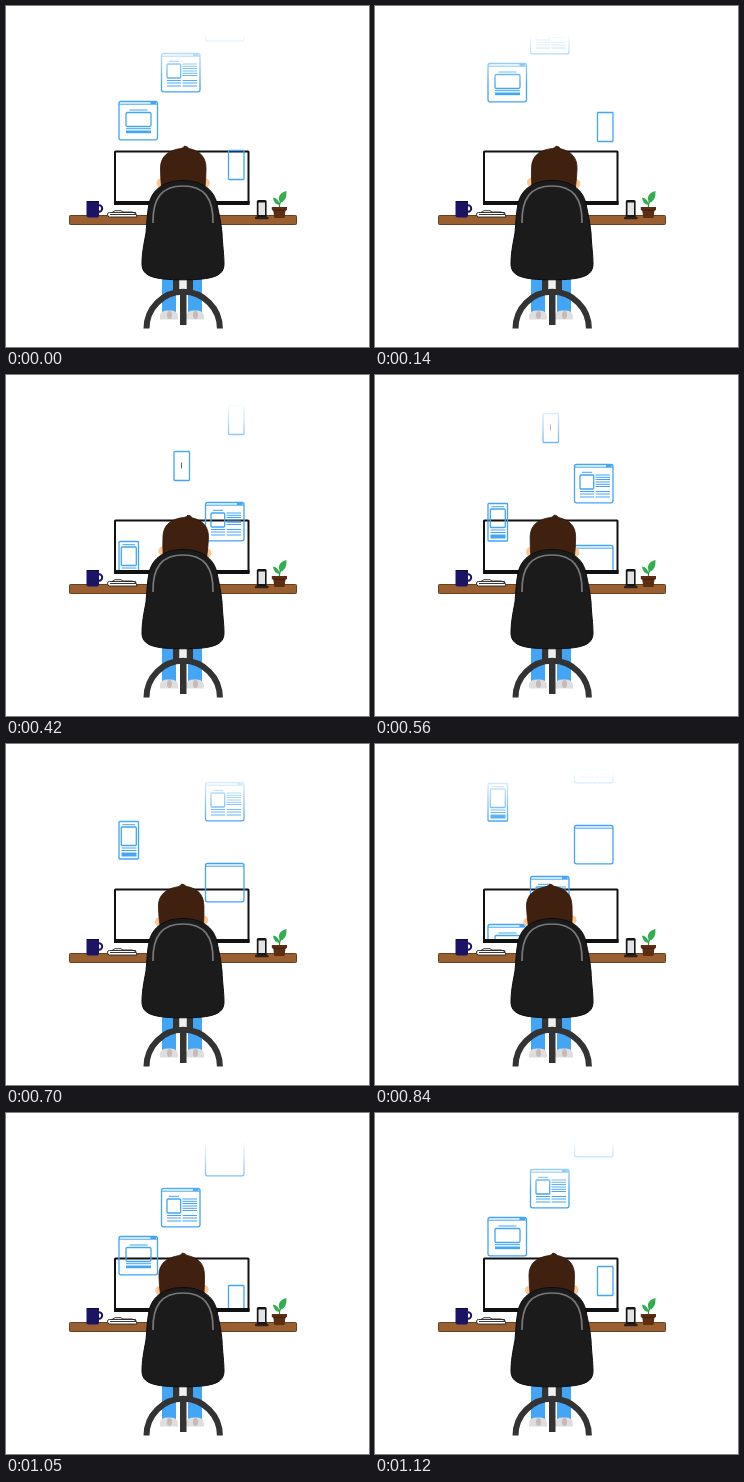
Animation of 363 by 341 pixels, one loop 1190 ms. Source, as an HTML page:

```html
<!DOCTYPE html>
<html lang="en">
<head>
<meta charset="utf-8">
<title>Designer at a desk</title>
<style>
  html, body { margin: 0; width: 100%; height: 100%; overflow: hidden; background: #fff; }
  svg { display: block; }
  .card { fill: none; stroke: #42a5f5; stroke-width: 1.3; }
  .card .thin { stroke-width: 1; }
  .card .bar { fill: #42a5f5; stroke: none; }
</style>
</head>
<body>
<svg width="363" height="341" viewBox="0 0 363 341">
  <defs>
    <linearGradient id="fade" gradientUnits="userSpaceOnUse" x1="0" y1="28" x2="0" y2="80">
      <stop offset="0" stop-color="#000"/>
      <stop offset="1" stop-color="#fff"/>
    </linearGradient>
    <mask id="rise" maskUnits="userSpaceOnUse" x="100" y="20" width="160" height="175">
      <rect x="100" y="20" width="160" height="175" fill="url(#fade)" style="color-interpolation:sRGB"/>
    </mask>
    <g id="leg">
      <rect x="-6" y="270" width="14" height="37" fill="#42a5f5"/>
      <path d="M-8 313.500V310Q-8 304.500 0 304.500H3Q10 304.500 10 311V313.500Z" fill="#dedede"/>
      <ellipse cx="1.500" cy="309" rx="2.500" ry="4" fill="#c3bcbc"/>
      <circle cx="1.500" cy="309" r="1" fill="#e9a9a0"/>
    </g>
  </defs>

  <!-- monitor -->
  <rect x="109" y="145.500" width="133.500" height="52.500" rx=".5" fill="#fff" stroke="#111" stroke-width="2"/>
  <rect x="108" y="195" width="135.500" height="4" fill="#111"/>

  <!-- desk -->
  <rect x="63.500" y="209.500" width="227" height="9" rx=".8" fill="#995f30" stroke="#66401f"/>

  <!-- mug -->
  <circle cx="93" cy="202.500" r="3.200" fill="none" stroke="#1b1464" stroke-width="2"/>
  <path d="M80.500 195H93V209.500Q93 211.500 91 211.500H82.500Q80.500 211.500 80.500 209.500Z" fill="#1b1464"/>
  <path d="M81 195.500H92.500" stroke="#0d0a3b"/>

  <!-- papers -->
  <path d="M101.500 208Q101.500 206.500 103.500 206.500H129.500L131 211H103.500Q101.500 211 101.500 208Z" fill="#fff" stroke="#222" stroke-width=".9"/>
  <path d="M106 206.500L109 204.700H115L117 206H126L130 207.500M104 208.500H130" fill="none" stroke="#222" stroke-width=".9"/>

  <!-- phone on stand -->
  <rect x="250.800" y="194" width="9.800" height="18" rx="1.500" fill="#151515"/>
  <rect x="252.500" y="196.500" width="6.500" height="12.500" fill="#e3e3e3"/>
  <rect x="249" y="210.800" width="13.500" height="2.400" rx=".8" fill="#2a211c"/>

  <!-- plant -->
  <path d="M273.500 202Q273 197 276 193" fill="none" stroke="#239244" stroke-width="1.300"/>
  <path d="M274 196.500Q270 188 280.500 185Q281 196 274 196.500Z" fill="#32ad4f"/>
  <path d="M273.500 199Q267.500 198 267 191.500Q273 192.500 273.500 199Z" fill="#32ad4f"/>
  <path d="M265.800 201H281V204H279.500L278.500 212H268.300L267.200 204H265.800Z" fill="#5b2d12"/>
  <path d="M266.500 204.300H280.300" stroke="#3c1b09" stroke-width=".8"/>

  <g mask="url(#rise)"><g id="cards"></g></g>

  <!-- person and chair -->
  <use href="#leg" x="162"/>
  <use href="#leg" x="190" transform="translate(-2 0)"/>
  <g id="head">
    <ellipse cx="154.500" cy="177" rx="4" ry="4.500" fill="#f9c795"/>
    <ellipse cx="199.800" cy="177" rx="4" ry="4.500" fill="#f9c795"/>
    <path d="M155.500 181Q154.500 172 154.500 162C154.500 150 163 144 175 142.500Q177.500 142 178.500 140Q181 140.200 183 142.500C194 145 200 151 200 162Q200 172 199 181Q190 187 177.500 187T155.500 181Z" fill="#40210f" stroke="#2f1709" stroke-width=".8"/>
  </g>
  <path d="M167 272H173.500V284H167ZM180.500 272H187V284H180.500Z" fill="#333"/>
  <rect x="173.500" y="274" width="7" height="9" fill="#f0f0f0"/>
  <path d="M140.500 322.500A36.700 36.700 0 0 1 213.900 322.500" fill="none" stroke="#333" stroke-width="6"/>
  <rect x="174" y="283" width="6.500" height="36" fill="#333"/>
  <path d="M177 174.500C195 174.500 208 183 211 198C213 208 215 216 216 227C216.500 240 218 248 218 258C218 270 207 273.800 177 273.800S136 270 136 258C136 248 137.500 240 140 227C141 216 141 208 143 198C146 183 159 174.500 177 174.500Z" fill="#1b1b1b" stroke="#0c0c0c"/>
  <path d="M147 217C146.500 192 156 180 177 180S207.500 192 207 217" fill="none" stroke="#777" stroke-width="1.700"/>
</svg>
<script>
  const STEP = 70, STEPS = 17, RISE = 19, SKIP = 13, CYCLE = 326;
  const box = (x, y, w, h, r = 1) => `<rect x="${x}" y="${y}" width="${w}" height="${h}" rx="${r}"/>`;
  const bar = (x, y, w, h) => `<rect class="bar" x="${x}" y="${y}" width="${w}" height="${h}"/>`;
  const lines = (x, w, ...ys) =>
    `<path class="thin" d="${ys.map(y => `M${x} ${y}h${w}`).join('')}"/>`;

  const frame = box(.5, .5, 38.5, 38.3, 2) + lines(.5, 38.5, 3.2);
  const tab = bar(32, 1, 5.500, 2);
  const hero = frame + tab + lines(11, 18, 9) + box(7.500, 11.500, 25, 14, 1.500)
    + lines(7.500, 25, 27.700) + bar(7.500, 29.500, 25, 2.700);
  const article = frame + tab + lines(8, 10, 8.300) + box(6, 11, 13.700, 14)
    + lines(21.500, 14.500, 11, 13.300, 15.500, 18, 20.300, 22.500, 27.500, 30, 33)
    + lines(6, 14, 27.500, 30, 33);
  const phone = box(.5, .5, 15.500, 29, .8);
  const cursor = phone + '<path stroke="#555" stroke-width=".9" d="M8 11.500v6"/>';
  const post = box(.5, .5, 19.500, 37.500, .8) + lines(4, 12.500, 3.700)
    + box(2.800, 6, 15, 18.500) + lines(3, 15, 27, 29.500) + bar(3, 31.500, 15, 4);

  // Left edge, top at the loop start, drawing
  const cards = [
    [112.500, 95, hero], [155, 47, article], [222, 144, phone], [167.500, 76 + 6 * RISE, cursor],
    [199, 241, article], [199, 322, frame], [112.500, 280, post]
  ];
  const layer = document.getElementById('cards');
  const head = document.getElementById('head');
  layer.innerHTML = cards.map(([, , art]) => `<g class="card">${art}</g>`).join('');

  function draw(ms) {
    const step = Math.floor(ms / STEP) % STEPS;
    const risen = step * RISE + (step > 8 ? SKIP : 0);
    cards.forEach(([x, top], i) => {
      const y = (top - risen + 60 + CYCLE) % CYCLE - 60;
      layer.children[i].setAttribute('transform', `translate(${x} ${y})`);
    });
    const tilt = 2.9 * Math.sin(2 * Math.PI * risen / CYCLE);
    head.setAttribute('transform', `rotate(${tilt} 177.5 222)`);
  }

  let start;
  function tick(now) {
    start ??= now;
    draw(now - start);
    requestAnimationFrame(tick);
  }
  draw(0);
  requestAnimationFrame(tick);
</script>
</body>
</html>
```
